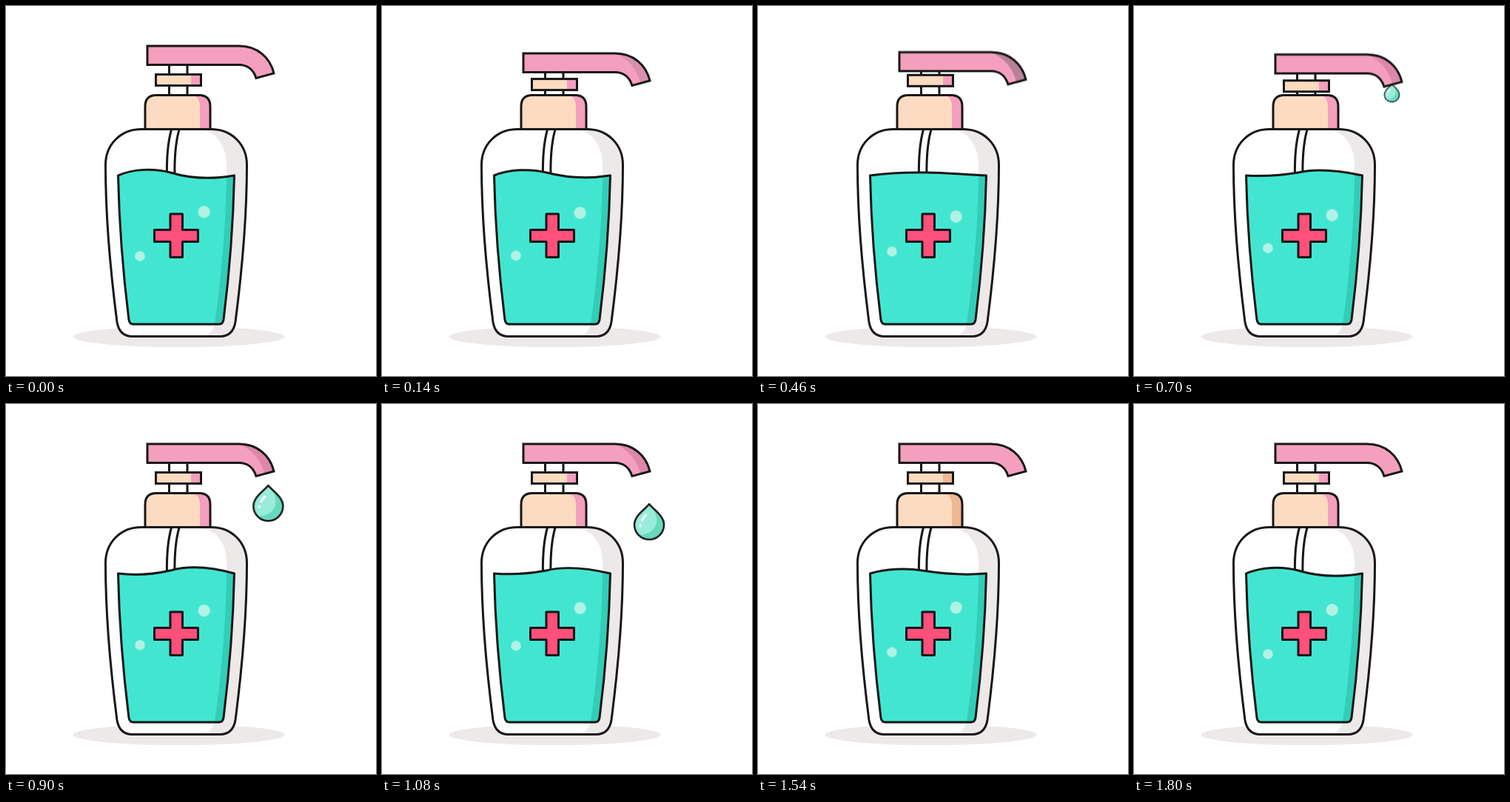
Animation, 500 px wide and 500 px high, one loop 1820 ms. Source, as an HTML page:

```html
<!DOCTYPE html>
<html lang="en">
<head>
<meta charset="utf-8">
<title>Hand sanitizer</title>
<style>
  html, body { margin: 0; width: 100%; height: 100%; overflow: hidden; background: #fff; }
  svg { display: block; width: 100vw; height: 100vh; }

  :root {
    --loop: 1820ms infinite;
    --smooth: cubic-bezier(.37, 0, .63, 1);
    --ink: #171717;
    --pink: #f49fbe;
    --peach: #fddbc0;
  }

  .line { stroke: var(--ink); stroke-width: 3; stroke-linejoin: round; stroke-linecap: round; }
  .open { fill: none; }
  .grey { fill: #ede9e9; }
  .pink { fill: var(--pink); }
  .peach { fill: var(--peach); }
  .teal { fill: #42e6d0; }
  .bubble { fill: #b0f2e6; }

  .head { animation: head var(--loop) var(--smooth); }
  .ring { animation: ring var(--loop) var(--smooth); }
  .wave { animation: wave var(--loop) var(--smooth); }
  .rise { animation: rise var(--loop) var(--smooth); }
  .bob { animation: bob var(--loop) var(--smooth); }
  .nozzle-shade { animation: nozzle-shade var(--loop) step-end; }
  .cap-shade { animation: cap-shade var(--loop) step-end; }
  .drop-x { animation: drop-x var(--loop) linear; }
  .drop-y { animation: drop-y var(--loop) linear; }
  .drop-size { animation: drop-size var(--loop) var(--smooth); }

  @keyframes head {
    0%, 48.9%, 100% { transform: translateY(0); }
    13.2% { transform: translateY(15.7px); }
    25% { transform: translateY(8.4px); }
    33% { transform: translateY(15.7px); }
  }
  @keyframes ring {
    0%, 49.5%, 100% { transform: translateY(0); }
    13.7% { transform: translateY(10px); }
    25.3% { transform: translateY(.8px); }
    34% { transform: translateY(10.2px); }
  }
  @keyframes wave {
    0%, 100% { d: path("M151.5 229C172 220 200 219 222 225C245 232 275 235 308.5 229C307 300 302 360 294 424Q293 430 288 430H172Q167 430 166 424C158 360 153 300 151.5 229Z"); }
    50% { d: path("M151.5 229C175 232 200 230 222 225C250 217 280 221 308.5 229C307 300 302 360 294 424Q293 430 288 430H172Q167 430 166 424C158 360 153 300 151.5 229Z"); }
  }
  @keyframes rise { 50% { transform: translateY(-12.3px); } }
  @keyframes bob {
    25.5% { transform: translateY(6.3px); }
    74.5% { transform: translateY(-4.7px); }
  }
  @keyframes nozzle-shade {
    0%, 65%, 100% { fill: var(--pink); }
    7% { fill: #d98fae; }
    20% { fill: #b9809a; }
    32% { fill: #dd88ab; }
  }
  @keyframes cap-shade {
    0%, 85%, 100% { fill: var(--pink); }
    65% { fill: #edb892; }
  }
  /* The drop speeds up along a curve: both axes run from 580 to 1560 ms. */
  @keyframes drop-x {
    0% { transform: translateX(345.8px); }
    31.87% { transform: translateX(345.8px); animation-timing-function: cubic-bezier(.333, .164, .667, .497); }
    85.71%, 100% { transform: translateX(385.4px); }
  }
  @keyframes drop-y {
    0% { transform: translateY(113.5px); }
    31.87% { transform: translateY(113.5px); animation-timing-function: cubic-bezier(.333, .03, .667, .363); }
    85.71%, 100% { transform: translateY(274.4px); }
  }
  @keyframes drop-size {
    0%, 31.87%, 85.71%, 100% { transform: scale(0); }
    45.05%, 59.34% { transform: scale(1); }
  }
</style>
</head>
<body>
<svg viewBox="0 0 500 500">
  <defs>
    <path id="bottle" d="M183 166.5H277C305 166.5 325.5 187 325.5 215C325.5 290 318 365 310 427C308 439 301 446.5 289 446.5H171C159 446.5 152 439 150 427C142 365 134.5 290 134.5 215C134.5 187 155 166.5 183 166.5Z"/>
    <path id="cap" d="M188 166.5V136Q188 120.5 203 120.5H261Q276 120.5 276 136V166.5Z"/>
    <path id="head" d="M191 54H315C340 54 357 70 362 91L338 97.5C334 85 325 79.5 315 79.5H191Z"/>
    <path id="side" d="M258 166C284 168 298 188 298 215C298 290 291 365 283 423C281 437 276 446 264 446.5H340V166Z"/>
    <path id="drop" d="M0 -24C4 -18 20 -9 20 4A20 20 0 0 1 -20 4C-20 -9 -4 -18 0 -24Z"/>
    <clipPath id="in-bottle"><use href="#bottle"/></clipPath>
    <clipPath id="in-cap"><use href="#cap"/></clipPath>
    <clipPath id="in-head"><use href="#head"/></clipPath>
    <clipPath id="in-drop"><use href="#drop"/></clipPath>
    <clipPath id="in-liquid"><path class="wave"/></clipPath>
  </defs>

  <ellipse class="grey" cx="233.5" cy="447" rx="143" ry="14"/>

  <use href="#bottle" fill="#fff"/>
  <use href="#side" class="grey" clip-path="url(#in-bottle)"/>
  <path class="line open" d="M223.5 167C218.5 185 217 205 217.5 229M234 167C229 185 227.5 205 228 229"/>
  <use href="#bottle" class="line open"/>

  <path class="wave teal"/>
  <g clip-path="url(#in-liquid)"><use href="#side" fill="#32cdb7"/></g>
  <path class="wave line open"/>
  <circle class="bubble rise" cx="181" cy="338" r="6.8"/>
  <circle class="bubble bob" cx="267.7" cy="278.2" r="8.2"/>
  <path class="line" fill="#ff4f7b" d="M222 281H238.500V302.500H259.500V318.500H238.500V339.500H222V318.500H200.500V302.500H222Z"/>

  <path class="line" fill="#fff" d="M220.500 78V121H245V78"/>
  <g class="ring">
    <path class="peach" d="M202.500 92.500H263.500V107.500H202.500Z"/>
    <path class="cap-shade" d="M250 92.500H263.500V107.500H250Z"/>
    <path class="line open" style="stroke-linejoin:miter" d="M202.500 92.500H263.500V107.500H202.500Z"/>
  </g>
  <use href="#cap" class="peach"/>
  <g clip-path="url(#in-cap)">
    <path class="cap-shade" d="M252 120Q262 123 262 137V167H277V120Z"/>
  </g>
  <use href="#cap" class="line open"/>

  <g class="drop-x"><g class="drop-y"><g class="drop-size">
    <use href="#drop" fill="#98ecd9"/>
    <g clip-path="url(#in-drop)">
      <path fill="#66d9bf" d="M2 -24C14 -8 16 16 -14 18L-10 26H24V-24Z"/>
    </g>
    <path d="M-9.500 -2Q-8 -6 -4.500 -9M-12 4V5.500" fill="none" stroke="#fff" stroke-width="3" stroke-linecap="round"/>
    <use href="#drop" class="line open" style="stroke-width:2.500"/>
  </g></g></g>

  <g class="head">
    <use href="#head" class="pink"/>
    <g clip-path="url(#in-head)">
      <path class="nozzle-shade" d="M311 53C332 60 344 74 350 96L366 92V53Z"/>
    </g>
    <use href="#head" class="line open" style="stroke-linejoin:miter"/>
  </g>
</svg>
</body>
</html>
```
